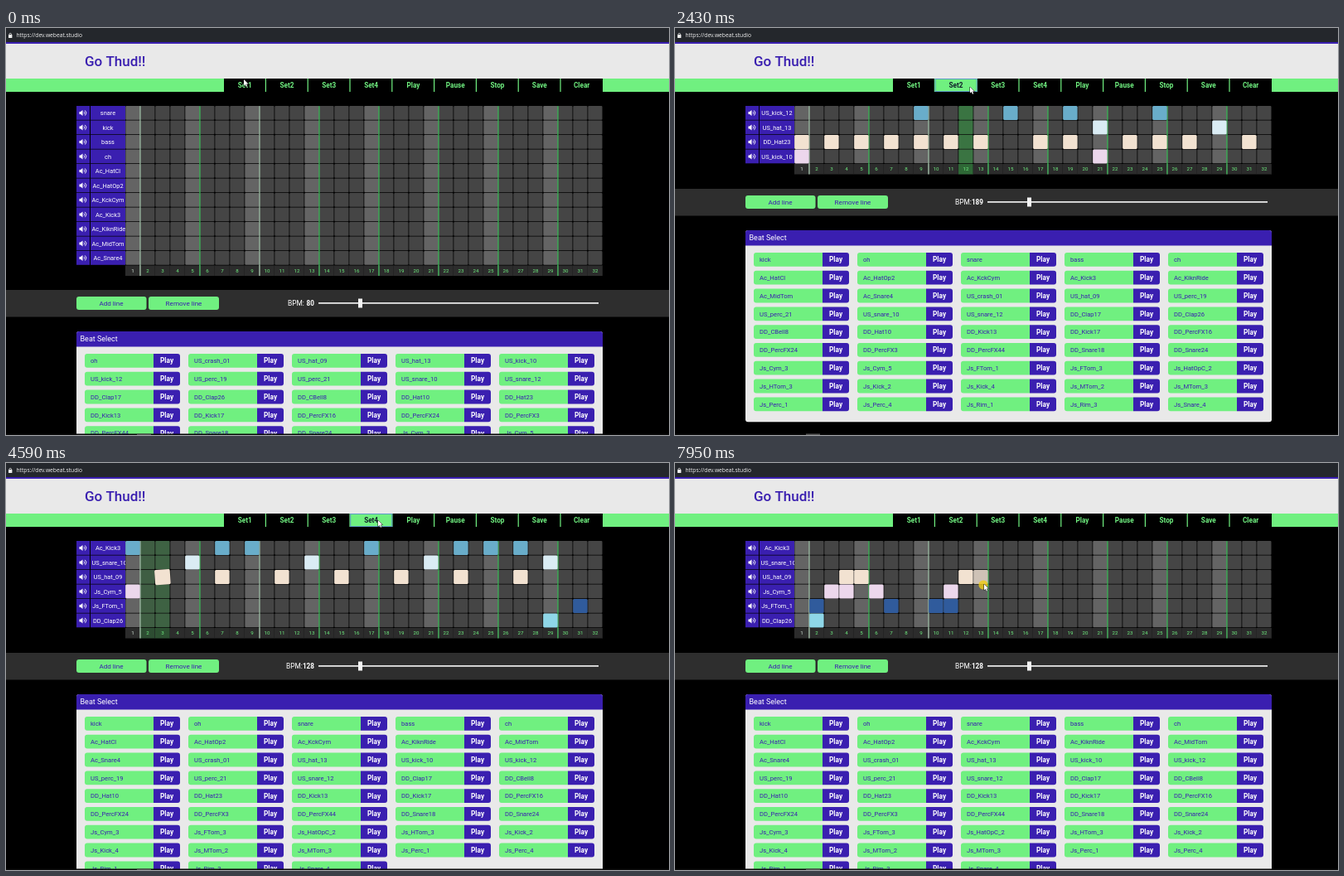
An HTML page with a canvas that plays this animation: 800x491 px, repeating every 8000 ms.

```html
<!DOCTYPE html>
<html lang="en">
<head>
<meta charset="utf-8">
<title>Beat grid</title>
<style>
html, body { margin: 0; width: 100%; height: 100%; overflow: hidden; background: #000; }
canvas { display: block; width: 800px; height: 491px; }
</style>
</head>
<body>
<canvas id="stage"></canvas>
<script>
const LOOP = 8000, W = 800, H = 491;
const GREEN = '#70f080', PURPLE = '#3a1fb0', PALE = '#e9e9e9';
const FONT = 'Roboto, "Open Sans", sans-serif';
const GRID_X = 144, GRID_Y = 94, COL = 18, ROW = 17.5, COLS = 32;
const NAV_X = 263, NAV_W = 50.8;
const NAV = ['Set1', 'Set2', 'Set3', 'Set4', 'Play', 'Pause', 'Stop', 'Save', 'Clear'];

const canvas = document.getElementById('stage');
const ctx = canvas.getContext('2d');
const dpr = window.devicePixelRatio || 1;
canvas.width = W * dpr;
canvas.height = H * dpr;

const group = (prefix, names) => names.split(' ').map(n => prefix + n);
const SOUNDS = [
  ...group('', 'kick oh snare bass ch'),
  ...group('Ac_', 'HatCl HatOp2 KckCym Kick3 KiknRide MidTom Snare4'),
  ...group('US_', 'crash_01 hat_09 hat_13 kick_10 kick_12 perc_19 perc_21 snare_10 snare_12'),
  ...group('DD_', 'Clap17 Clap26 CBell8 Hat10 Hat23 Kick13 Kick17 PercFX16 PercFX24 PercFX3 PercFX44 Snare18 Snare24'),
  ...group('Js_', 'Cym_3 Cym_5 FTom_1 FTom_3 HatOpC_2 HTom_3 Kick_2 Kick_4 MTom_2 MTom_3 Perc_1 Perc_4 Rim_1 Rim_3 Snare_4')
];
const ROW_COLORS = ['#69adca', '#daecf4', '#f2e2d1', '#ecd7ec', '#305b9c', '#8fd7e8'];

// Each line: sound name, then the columns that are switched on.
const makeSet = (from, bpm, lines, snareColor) => ({
  from, bpm, snareColor,
  lines: lines.map(line => {
    const [name, ...on] = line.split(' ');
    return { name, on: on.map(Number) };
  })
});
const SETS = [
  makeSet(0, 80, [
    'snare', 'kick', 'bass', 'ch', 'Ac_HatCl', 'Ac_HatOp2', 'Ac_KckCym',
    'Ac_Kick3', 'Ac_KiknRide', 'Ac_MidTom', 'Ac_Snare4'
  ]),
  makeSet(300, 146, [
    'DD_Kick13 1 7 13 17 23', 'US_snare_10 9 25', 'snare 3 5 19 21',
    'DD_Hat23 4 6 20 22', 'US_perc_19 8 24'
  ], '#20c8f6'),
  makeSet(1903, 189, [
    'US_kick_12 9 15 19 25', 'US_hat_13 21 29',
    'DD_Hat23 1 3 5 7 9 11 13 17 19 23 25 27 31', 'US_kick_10 1 21'
  ]),
  makeSet(3117, 130, [
    'Ac_Kick3 1 7 21', 'US_snare_10 9 25',
    'DD_Hat10 1 4 7 9 12 15 17 20 23 25 28 31',
    'US_hat_13 5 13 21 29', 'DD_PercFX3 4 19 32'
  ]),
  makeSet(4480, 128, [
    'Ac_Kick3 1 7 9 17 23 25 27', 'US_snare_10 5 13 21 29',
    'US_hat_09 3 7 11 15 19 23 27', 'Js_Cym_5 1', 'Js_FTom_1 31', 'DD_Clap26 29'
  ]),
  makeSet(5500, 128, ['Ac_Kick3', 'US_snare_10', 'US_hat_09', 'Js_Cym_5', 'Js_FTom_1', 'DD_Clap26'])
];

// Button clicks: time and nav index (-1 drops the focus).
const CLICKS = [[300, 0], [1390, 4], [1903, 1], [3117, 2], [4480, 3], [5500, 6], [6780, -1]];
const DRAG_START = 6780;

// Drag stroke over the grid: time, column, row; "skip" points leave no mark.
const STROKE = [
  [6800, 2, 6], [6930, 2, 5], [7030, 3, 4], [7110, 4, 4], [7170, 4, 3], [7240, 5, 3],
  [7330, 6, 4], [7420, 7, 5], [7510, 8.5, 5.8, 'skip'], [7600, 10, 5], [7740, 11, 5],
  [7800, 11, 4], [7845, 12, 3], [7880, 13, 3]
];
const cellX = c => GRID_X + (c - 1) * COL;
const cellY = r => GRID_Y + (r - 1) * ROW;
const CURSOR = [
  [0, 287, 62], [90, 287, 62], [250, 288, 69], [600, 290, 69], [1200, 488, 71], [1390, 490, 71],
  [1490, 438, 72], [1800, 342, 70], [2250, 344, 70], [2430, 356, 71], [2660, 362, 71],
  [3000, 390, 70], [3450, 396, 70], [3670, 416, 69], [4300, 440, 70], [4590, 449, 69],
  [5000, 470, 70], [5400, 592, 70], [5560, 593, 70], [6000, 321, 135], [6120, 321, 135],
  [6600, 190, 180],
  ...STROKE.map(([t, c, r]) => [t, cellX(c) + 9, cellY(r) + 9]),
  [7950, 373, 146], [8000, 373, 146]
];
// Playhead position in columns, not wrapped.
const PLAYHEAD = [
  [1380, 1], [1490, 2.12], [1903, 6.13], [2430, 12.8], [3117, 21.5],
  [3670, 26.3], [4590, 35.12], [5500, 42.9]
];

const clamp = v => Math.max(0, Math.min(1, v));
const smooth = k => k * k * (3 - 2 * k);

function along(points, t, dim, ease = k => k) {
  let i = points.findIndex(p => p[0] > t);
  if (i === 0) return points[0][dim];
  if (i < 0) return points[points.length - 1][dim];
  const a = points[i - 1], b = points[i];
  return a[dim] + (b[dim] - a[dim]) * ease((t - a[0]) / (b[0] - a[0]));
}
function cursorAt(t) {
  const ease = t < 6600 ? smooth : undefined;
  return { x: along(CURSOR, t, 1, ease), y: along(CURSOR, t, 2, ease) };
}
function rect(x, y, w, h, color) {
  ctx.fillStyle = color;
  ctx.fillRect(x, y, w, h);
}
function round(x, y, w, h, radii, color) {
  ctx.fillStyle = color;
  ctx.beginPath();
  ctx.roundRect(x, y, w, h, radii);
  ctx.fill();
}
function text(str, x, y, size, color, align = 'left', weight = 400, family = FONT) {
  ctx.font = `${weight} ${size}px ${family}`;
  ctx.textAlign = align;
  ctx.textBaseline = 'middle';
  ctx.fillStyle = color;
  ctx.fillText(str, x, y + 0.5);
}

function drawHeader() {
  rect(0, 0, W, 17, '#24272c');
  round(3, 8, 4.4, 4, 0.6, '#eee');
  ctx.strokeStyle = '#eee';
  ctx.lineWidth = 0.8;
  ctx.beginPath();
  ctx.arc(5.2, 7.8, 1.4, Math.PI, 0);
  ctx.stroke();
  text('https://dev.webeat.studio', 12.5, 8.7, 6.7, '#f2f2f2', 'left', 400, '"Open Sans", "Noto Sans", sans-serif');
  rect(0, 17, W, 2, PURPLE);
  rect(0, 19, W, 42, PALE);
  text('Go Thud!!', 95, 40, 17, PURPLE, 'left', 500);
}

function hoverAmount(t, i) {
  // Background fade: average of the hover state over a short lagging window.
  let sum = 0;
  for (let k = 0; k < 4; k++) {
    const { x, y } = cursorAt(t - 60 - k * 20);
    if (y > 62.5 && y < 77 && Math.floor((x - NAV_X) / NAV_W) === i) sum++;
  }
  return sum / 4;
}
function drawNav(t) {
  rect(0, 61, W, 16, GREEN);
  rect(NAV_X, 61, 457, 16, '#000');
  const last = CLICKS.filter(c => c[0] <= t).pop();
  const focus = last ? last[1] : -1;
  NAV.forEach((label, i) => {
    const x = NAV_X + i * NAV_W, hot = hoverAmount(t, i);
    ctx.globalAlpha = hot;
    rect(x, 61, NAV_W, 16, GREEN);
    ctx.globalAlpha = 1;
    if (i < 8) rect(x + NAV_W - 1, 61, 1.2, 16, GREEN);
    if (i === focus) {
      ctx.strokeStyle = '#5b9cc4';
      ctx.lineWidth = 1;
      ctx.strokeRect(x + 0.3, 61.5, NAV_W - 0.8, 15);
    }
    text(label, x + 25.2, 69, 8.2, hot > 0.5 ? '#10202a' : GREEN, 'center', 700);
  });
}

function drawSpeaker(x, y) {
  ctx.fillStyle = ctx.strokeStyle = '#fff';
  ctx.beginPath();
  [[-4, -1.4], [-2.4, -1.4], [0, -3.6], [0, 3.6], [-2.4, 1.4], [-4, 1.4]]
    .forEach(([dx, dy]) => ctx.lineTo(x + dx, y + dy));
  ctx.fill();
  ctx.lineWidth = 0.9;
  for (const r of [2, 4]) {
    ctx.beginPath();
    ctx.arc(x + 0.2, y, r, -0.9, 0.9);
    ctx.stroke();
  }
}

// Time in columns since the playhead entered column c, or -1.
function columnAge(t, c) {
  if (t < 1380 || t >= 5500) return -1;
  const p = along(PLAYHEAD, t, 1);
  const age = ((p - c) % COLS + COLS) % COLS;
  return age > p - 1 ? -1 : age;
}
function glow(age) {
  if (age < 0) return 0;
  return age < 1 ? clamp(0.35 + age * 2) : clamp(1 - (age - 1) / 0.28);
}
function drawBeat(c, r, color, age, alpha = 1) {
  const kick = age >= 0 && age < 1.6 ? Math.pow(Math.sin(Math.PI * age / 1.6), 0.4) : 0;
  ctx.save();
  ctx.globalAlpha = alpha;
  ctx.translate(cellX(c) + 9, cellY(r) + 8.6);
  ctx.rotate(-0.12 * kick);
  ctx.scale(1 + 0.12 * kick, 1 + 0.12 * kick);
  round(-8.8, -8.5, 17.4, 17, 1.5, color);
  ctx.restore();
}
function drawGrid(t, set) {
  const n = set.lines.length, numY = GRID_Y + n * ROW;
  set.lines.forEach(({ name }, i) => {
    const y = cellY(i + 1);
    rect(85, y, 16, 16.8, PURPLE);
    rect(102, y, 42, 16.8, PURPLE);
    drawSpeaker(92.5, y + 8.5);
    ctx.save();
    ctx.beginPath();
    ctx.rect(102, y, 42.3, 17);
    ctx.clip();
    ctx.font = `400 7.4px ${FONT}`;
    const wide = ctx.measureText(name).width > 40;
    text(name, wide ? 103.5 : 123, y + 8.6, 7.4, '#fff', wide ? 'left' : 'center');
    ctx.restore();
  });
  rect(GRID_X, numY, COLS * COL, 12.5, '#2c2c2c');
  for (let c = 1; c <= COLS; c++) {
    const x = cellX(c), lit = glow(columnAge(t, c)), strong = c % 4 === 1;
    for (let r = 1; r <= n; r++) round(x + 0.3, cellY(r), 17.2, 16.8, 1, strong ? '#646464' : '#454545');
    if (lit) {
      ctx.globalAlpha = lit * 0.52;
      for (let r = 1; r <= n; r++) round(x + 0.3, cellY(r), 17.2, 16.8, 1, '#30a040');
      rect(x, numY, COL, 12.5, '#30a040');
      ctx.globalAlpha = 1;
    }
    rect(x + 17.5, numY, 0.5, 12.5, '#1c1c1c');
    text(c, x + 9, numY + 6, 6.2, c === 1 ? '#d8e8dc' : GREEN, 'center');
  }
  for (let c = 1; c < COLS; c += 4) {
    rect(cellX(c) + 17.4, GRID_Y, 1.1, n * ROW + 12.5, c === 1 || c === 9 ? '#c4e8cc' : '#50e070');
  }
  const colorOf = r => r === 3 && set.snareColor || ROW_COLORS[r - 1];
  set.lines.forEach(({ on }, i) => {
    for (const c of on) drawBeat(c, i + 1, colorOf(i + 1), columnAge(t, c));
  });
  for (const [at, c, r, skip] of STROKE) {
    if (t >= at && !skip) drawBeat(c, r, colorOf(r), -1, clamp((t - at) / 95));
  }
}

function drawControls(y, bpm) {
  rect(0, y, W, 32.5, '#2e2e2e');
  round(85, y + 8, 84.5, 16, 3, GREEN);
  round(172, y + 8, 85, 16, 3, GREEN);
  text('Add line', 127, y + 16, 8.1, PURPLE, 'center');
  text('Remove line', 214.5, y + 16, 8.1, PURPLE, 'center');
  text(bpm, 372, y + 15.7, 8.2, '#fff', 'right', 700);
  text('BPM:', bpm < 100 ? 340 : 338, y + 15.7, 8.4, '#fff');
  rect(377, y + 15, 338, 1.8, '#e4e4e4');
  rect(425, y + 10.5, 5, 11, '#f4f4f4');
}

function drawPanel(y, set) {
  const used = set.lines.map(l => l.name);
  const list = SOUNDS.filter(s => !used.includes(s));
  const rows = Math.ceil(list.length / 5);
  round(85, y, 635, 35 + rows * 21.8, 3, PALE);
  round(85, y, 635, 18.5, [3, 3, 0, 0], PURPLE);
  text('Beat Select', 89.5, y + 9.3, 9, '#fff');
  list.forEach((name, i) => {
    const x = 95 + (i % 5) * 125, top = y + 27 + Math.floor(i / 5) * 21.8;
    round(x, top, 83, 16.8, [3, 0, 0, 3], GREEN);
    round(x + 83, top, 32, 16.8, [0, 3, 3, 0], PURPLE);
    text(name, x + 7, top + 8.4, 7.6, PURPLE);
    text('Play', x + 99, top + 8.4, 8.3, '#fff', 'center', 700);
  });
  rect(0, 489.5, W, 1.5, '#0a0a0a');
  rect(158, 489.5, 17, 1.5, '#555');
}

function drawCursor(t) {
  const { x, y } = cursorAt(t);
  const pressed = t >= DRAG_START || CLICKS.some(c => Math.abs(t - c[0]) < 70);
  if (pressed) {
    ctx.fillStyle = 'rgba(240, 205, 20, 0.8)';
    ctx.beginPath();
    ctx.arc(x - 1, y + 1, 5.6, 0, Math.PI * 2);
    ctx.fill();
  }
  ctx.beginPath();
  [[0, 0], [0, 7.6], [1.8, 6], [3, 8.8], [4.2, 8.3], [3, 5.6], [5.4, 5.4]]
    .forEach(([dx, dy]) => ctx.lineTo(x + dx, y + dy));
  ctx.closePath();
  ctx.lineWidth = 1;
  ctx.strokeStyle = '#111';
  ctx.stroke();
  ctx.fillStyle = '#fff';
  ctx.fill();
}

function draw(t) {
  const set = SETS.filter(s => s.from <= t).pop();
  const barY = Math.round(123.7 + set.lines.length * ROW);
  ctx.setTransform(dpr, 0, 0, dpr, 0, 0);
  rect(0, 0, W, H, '#000');
  drawHeader();
  drawNav(t);
  drawGrid(t, set);
  drawControls(barY, set.bpm);
  drawPanel(barY + 50, set);
  drawCursor(t);
}

const start = performance.now();
function tick() {
  draw((performance.now() - start) % LOOP);
  requestAnimationFrame(tick);
}
tick();
</script>
</body>
</html>
```
